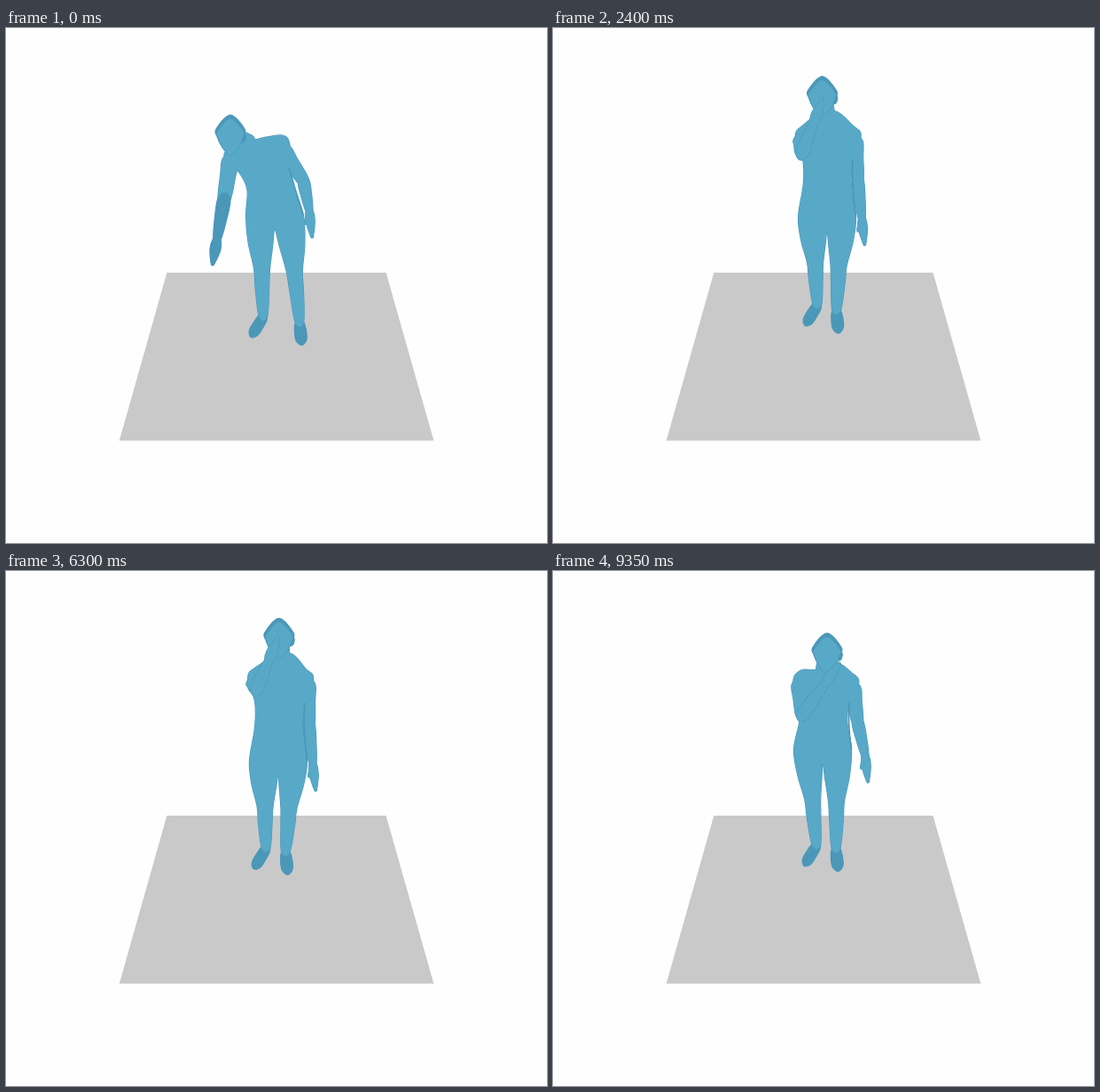
An HTML page with a canvas that plays this animation: 610 by 581 pixels, repeating every 9.4 s.

```html
<!DOCTYPE html>
<html lang="en">
<head>
<meta charset="utf-8">
<title>Moving figure</title>
<style>
  html, body { margin: 0; width: 100%; height: 100%; overflow: hidden; background: #fefefe; }
  canvas { display: block; }
</style>
</head>
<body>
<canvas id="stage" width="610" height="581"></canvas>
<script>
const ctx = document.getElementById('stage').getContext('2d');
const LOOP = 9400, STEP = 50;
const SKIN = '#58a8c8', SHADE = '#4b97b8', EDGE = '#4a98b9';

const mix = (a, b, k) => [a[0] + (b[0] - a[0]) * k, a[1] + (b[1] - a[1]) * k];
const add = (p, x, y) => [p[0] + x, p[1] + y];

function ease(t, from, to) {
  const k = Math.min(1, Math.max(0, (t - from) / (to - from)));
  return k * k * (3 - 2 * k);
}

// How strongly each movement acts at a given time.
const moves = {
  bend: t => 1 - ease(t, 0, 2700),
  shift: t => ease(t, 0, 1000) * (1 - ease(t, 1350, 2700)),
  sway: t => ease(t, 3300, 4900) * (1 - ease(t, 4950, 7200)),
  drop: t => ease(t, 6300, 8300) * (1 - ease(t, 8500, 9350)),
  bow: t => ease(t, 8400, 9350)
};

// Upright position of each joint and its offset at full strength of a movement.
const joints = {
  head: { rest: [304, 76], bend: [-51, 45], shift: [10, 0], sway: [11, 1], bow: [5, 17] },
  chest: { rest: [309, 120], bend: [-26, 18], shift: [17, 2], sway: [2, 1], bow: [-1, 4] },
  pelvis: { rest: [307, 213], bend: [-4, -1], shift: [17, 1], sway: [0, 2], bow: [-3, -12] },
  ankleL: { rest: [297, 312], bend: [-7, 14], shift: [10, 4], sway: [-11, 4], bow: [0, -2] },
  ankleR: { rest: [318, 318], bend: [13, 15], shift: [8, 8], sway: [-8, -1], bow: [1, -4] },
  wristR: { rest: [346, 215], bend: [-4, -9], shift: [19, -2], sway: [0, 7], bow: [6, -7] },
  elbowL: { rest: [280, 138], bend: [-34, 55], shift: [12, 17], sway: [6, -10], drop: [-17, 14], bow: [1, 25] },
  wristL: { rest: [294, 105], bend: [-56, 133], shift: [11, -13], sway: [4, -7], drop: [-8, 8], bow: [12, 23] }
};

function poseAt(t) {
  const pose = {};
  for (const name in joints) {
    const { rest, ...offsets } = joints[name];
    pose[name] = rest;
    for (const move in offsets) {
      const w = moves[move](t), [x, y] = offsets[move];
      pose[name] = add(pose[name], x * w, y * w);
    }
  }
  return pose;
}

// Smooth closed outline through the given points.
function blob(points) {
  const path = new Path2D(), n = points.length;
  const at = i => points[(i + n) % n];
  path.moveTo(...points[0]);
  for (let i = 0; i < n; i++) {
    const a = at(i), b = at(i + 1), before = at(i - 1), after = at(i + 2);
    path.bezierCurveTo(
      a[0] + (b[0] - before[0]) / 6, a[1] + (b[1] - before[1]) / 6,
      b[0] - (after[0] - a[0]) / 6, b[1] - (after[1] - a[1]) / 6, b[0], b[1]);
  }
  path.closePath();
  return path;
}

// Tapered segment with half widths at start, middle and end.
function limb(a, b, ra, rm, rb) {
  const d = Math.hypot(b[0] - a[0], b[1] - a[1]) || 1;
  const u = [(b[0] - a[0]) / d, (b[1] - a[1]) / d];
  const side = (p, r) => add(p, -u[1] * r, u[0] * r);
  const m = mix(a, b, 0.42);
  return blob([
    add(a, -u[0] * ra, -u[1] * ra), side(a, ra), side(m, rm), side(b, rb),
    add(b, u[0] * rb, u[1] * rb), side(b, -rb), side(m, -rm), side(a, -ra)
  ]);
}

// Edges first, so joined parts share one outline.
function paint(paths, fill = SKIN) {
  ctx.strokeStyle = EDGE;
  ctx.lineWidth = 1.2;
  paths.forEach(p => ctx.stroke(p));
  ctx.fillStyle = fill;
  paths.forEach(p => ctx.fill(p));
}

function drawFloor() {
  ctx.fillStyle = '#fefefe';
  ctx.fillRect(0, 0, 610, 581);
  ctx.fillStyle = '#c9c9c9';
  ctx.beginPath();
  ctx.moveTo(181.4, 276);
  ctx.lineTo(428.5, 276);
  ctx.lineTo(482.3, 465.5);
  ctx.lineTo(127.8, 465.5);
  ctx.fill();
}

// Outline of one half of the body, from neck to crotch; s is -1 or 1.
function bodySide(p, s) {
  const lean = p.chest[0] - p.pelvis[0];
  const tilt = s * lean * 0.3;
  const ankle = s < 0 ? p.ankleL : p.ankleR;
  const shoulder = add(p.chest, s * 39, tilt);
  const waist = add(mix(p.pelvis, p.chest, 0.4), s * 27 - lean * 0.2, 0);
  const hip = add(p.pelvis, s * 32.5, 0);
  const crotch = add(p.pelvis, 0, 15);
  const knee = mix(add(p.pelvis, s * 16, 0), ankle, 0.52);
  const calf = mix(knee, ankle, 0.4);
  const armpit = add(mix(shoulder, waist, 0.5), -s * 5, 0);
  return {
    shoulder, armpit, waist, hip,
    outline: [
      add(mix(p.chest, p.head, 0.6), s * 12, s > 0 ? -1 : 6),
      add(p.chest, s * 28, tilt - 11),
      add(shoulder, -s * 2, 0), armpit, waist, hip,
      add(mix(hip, add(knee, s * 9, 0), 0.5), s * 2, 0),
      add(knee, s * 9, 0), add(calf, s * 8, 0), add(ankle, s * 4.5, 0),
      add(ankle, -s * 4.5, 0), add(calf, -s * 7.5, 0), add(knee, -s * 9, 0),
      mix(crotch, add(knee, -s * 9, 0), 0.4)
    ],
    crotch
  };
}

function drawHead(head) {
  const skull = (y, r) => limb(add(head, 0, y), add(head, 0, 13), r, r - 1, 9.5);
  paint([limb(add(head, 15, 0), add(head, 14, 6), 2.2, 2.5, 2)], SHADE);
  paint([skull(-7, 16)], SHADE);
  ctx.fillStyle = SKIN;
  ctx.fill(skull(-4, 14.5));
}

function draw(t) {
  const p = poseAt(t);
  const left = bodySide(p, -1), right = bodySide(p, 1);
  const lean = p.chest[0] - p.pelvis[0];
  drawFloor();

  paint([
    limb(p.ankleL, add(p.ankleL, -11, 18), 5, 6, 5.5),
    limb(p.ankleR, add(p.ankleR, 2, 19), 5, 6.5, 6)
  ], SHADE);

  const shoulderL = add(left.shoulder, 9, 5), shoulderR = add(right.shoulder, -9, 7);
  const elbowR = add(mix(shoulderR, p.wristR, 0.5), -lean * 0.4, 0);
  paint([
    blob([...right.outline, right.crotch, ...left.outline.reverse()]),
    limb(mix(p.chest, p.head, 0.9), mix(p.chest, p.head, 0.3), 10, 11, 11),
    limb(shoulderR, elbowR, 9, 8, 6.3),
    limb(elbowR, p.wristR, 6.3, 6.2, 4),
    limb(p.wristR, add(p.wristR, 3, 29), 4, 5, 1.5),
    limb(p.wristR, add(p.wristR, -4, 14), 3, 2.5, 1.5),
    limb(shoulderL, p.elbowL, 9, 8.5, 7)
  ]);

  ctx.strokeStyle = SHADE;
  ctx.lineWidth = 1.6;
  ctx.beginPath();
  ctx.moveTo(...right.armpit);
  ctx.quadraticCurveTo(...right.waist, ...right.hip);
  ctx.stroke();
  drawHead(p.head);

  const reach = Math.hypot(p.wristL[0] - p.elbowL[0], p.wristL[1] - p.elbowL[1]);
  const handL = mix(p.elbowL, p.wristL, 1 + 28 / Math.max(reach, 25));
  paint([
    limb(p.elbowL, p.wristL, 7, 7, 4.3),
    limb(p.wristL, handL, 4.3, 6, 2)
  ], moves.bend(t) > 0.85 ? SHADE : SKIN);
}

const start = performance.now();
function tick(now) {
  const t = Math.max(0, now - start) % LOOP;
  draw(Math.floor(t / STEP) * STEP);
  requestAnimationFrame(tick);
}
draw(0);
requestAnimationFrame(tick);
</script>
</body>
</html>
```
